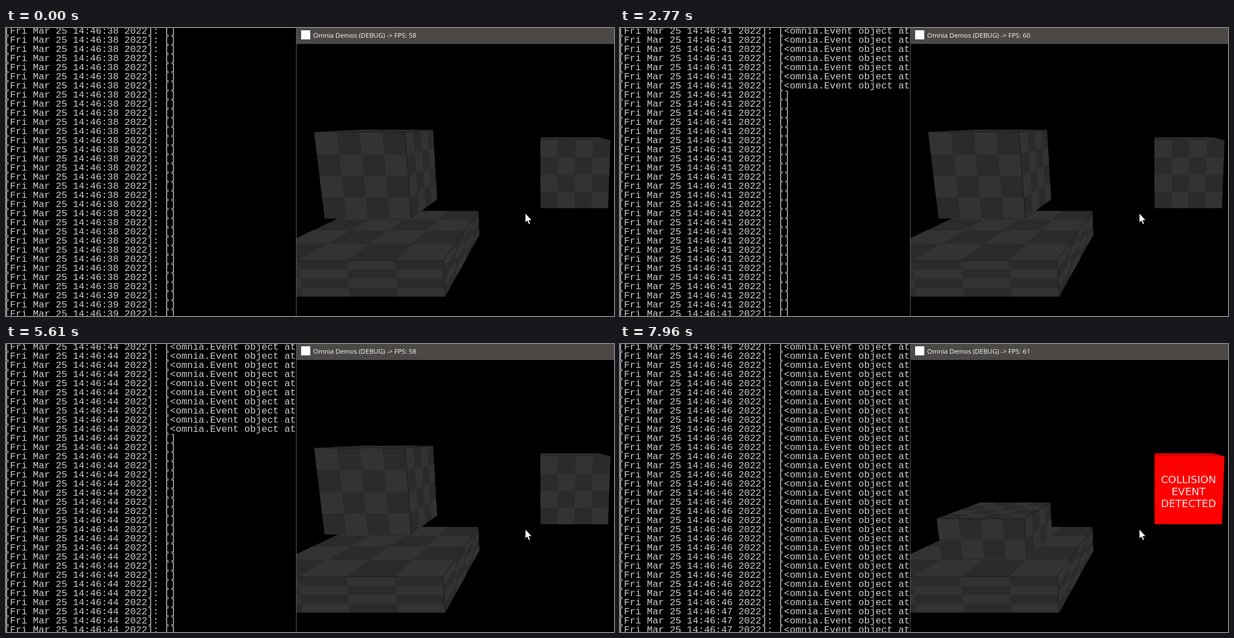
An HTML page with a canvas for the animation above (8 s loop, 1063x505 px).

```html
<!DOCTYPE html>
<html lang="en">
<head>
<meta charset="utf-8">
<title>Collision events</title>
<style>
html, body { margin: 0; width: 100%; height: 100%; overflow: hidden; background: #000; }
canvas { display: block; }
</style>
</head>
<body>
<canvas id="stage" width="1063" height="505"></canvas>
<script>
const ctx = document.getElementById('stage').getContext('2d');
const LOOP = 8000;
const ROWS = 32, LINE_MS = 20.5, SECOND_MS = 995, PRINT_LAG = 20;
const STEP_MS = 210, CONTACT = 2;
const LIGHT = '#333', DARK = '#2b2b2b', EDGE = '#1a1a1a';
const FPS = [58, 52, 61, 60, 58, 61, 58, 58, 61];

// The cube goes down by some steps and later comes up again
const plunges = [
  { down: 150, up: 2030, steps: 3 },
  { down: 3395, up: 4940, steps: 3 },
  { down: 6500, up: Infinity, steps: 3 },
  { down: 7930, up: Infinity, steps: 1 }
];

const stepsSince = (start, t, max) =>
  Math.max(0, Math.min(max, Math.floor((t - start) / STEP_MS) + 1));

const depthAt = t => plunges.reduce((sum, { down, up, steps }) =>
  sum + stepsSince(down, t, steps) - stepsSince(up, t, steps), 0);

const hitAt = t => depthAt(t) >= CONTACT;

function logLine(t) {
  const second = 39 + Math.floor((t + 55) / SECOND_MS);
  const events = hitAt(t - PRINT_LAG) ? '[<omnia.Event object at' : '[]';
  return `[Fri Mar 25 14:46:${second} 2022]: ${events}`;
}

// Camera: depth lines meet at (936, 165), verticals at (936, 3500)
function project(x, y, z) {
  const w = 1 + y + z;
  return [936 + x / w, (408 + 3500 * y + 165 * z) / w];
}

function path(points) {
  ctx.beginPath();
  points.forEach(p => ctx.lineTo(...p));
}

// A checkered face; at(u, v) gives the screen point
function face(at, light, dark) {
  const quad = (u, v, s, color) => {
    path([at(u, v), at(u + s, v), at(u + s, v + s), at(u, v + s)]);
    ctx.fillStyle = color;
    ctx.fill();
  };
  quad(0, 0, 1, dark);
  if (light === dark) return;
  for (let col = 0; col < 4; col++)
    for (let row = col % 2; row < 4; row += 2) quad(col / 4, row / 4, 1 / 4, light);
}

function box({ x, y, z, w, h, d, floor = 1 }, front, top = front) {
  const at = (u, v, s) => project(x + w * u, Math.min(y + h * v, floor), z + d * s);
  face((u, v) => at(u, 0, 1 - v), ...top);
  if (x + w < 0) face((u, v) => at(1, v, u), ...front);
  face((u, v) => at(u, v, 0), ...front);
  return at;
}

function outlinedBox(shape) {
  const at = box(shape, [LIGHT, DARK]);
  ctx.strokeStyle = EDGE;
  ctx.lineWidth = 1;
  const corner = at(1, 0, 0);
  for (const end of [at(0, 0, 0), at(1, 1, 0), at(1, 0, 1)]) {
    path([corner, end]);
    ctx.stroke();
  }
}

function drawConsole(t) {
  ctx.font = '16.67px "Liberation Mono", monospace';
  ctx.textAlign = 'left';
  ctx.fillStyle = '#ccc';
  for (let row = 0; row < ROWS; row++) {
    ctx.fillText(logLine(t - (ROWS - 1 - row) * LINE_MS), -3, 10 + 16 * row);
  }
}

function drawScene(t) {
  const hit = hitAt(t);
  outlinedBox({ x: -511, y: 0, z: 0, w: 339.5, h: .0208, d: .56 });
  outlinedBox({ x: -430, y: -.0673 + .0105 * depthAt(t), z: .15, w: 172, h: .0519, d: .28, floor: 0 });
  box({ x: -2.2, y: -.0594, z: .466, w: 172.2, h: .0526, d: .28 },
    hit ? ['#f00', '#f00'] : [LIGHT, DARK], hit ? ['#d80000', '#d80000'] : [DARK, DARK]);
  if (hit) {
    ctx.font = '18px "DejaVu Sans", sans-serif';
    ctx.textAlign = 'center';
    ctx.fillStyle = '#ffe4e4';
    ['COLLISION', 'EVENT', 'DETECTED'].forEach((s, i) => ctx.fillText(s, 994, 244 + 21 * i));
  }
}

function drawWindow(t) {
  ctx.fillStyle = '#000';
  ctx.fillRect(507, 0, 556, 505);
  ctx.fillStyle = '#5a5a5a';
  ctx.fillRect(507, 0, 1, 505);
  ctx.save();
  ctx.beginPath();
  ctx.rect(508, 28, 555, 477);
  ctx.clip();
  drawScene(t);
  ctx.restore();

  ctx.fillStyle = '#4b4846';
  ctx.fillRect(508, 0, 555, 28);
  ctx.fillStyle = '#fff';
  ctx.fillRect(516, 4, 16, 16);
  ctx.font = '11.5px "Open Sans", sans-serif';
  ctx.textAlign = 'left';
  ctx.fillText(`Omnia Demos (DEBUG) -> FPS: ${FPS[Math.floor((t + 400) / 1000)]}`, 537, 17);
}

function drawCursor() {
  path([[908, 325], [908, 341], [911.5, 338], [914, 344], [916.5, 343], [914, 337.3], [919, 337]]);
  ctx.closePath();
  ctx.fillStyle = '#fff';
  ctx.fill();
  ctx.strokeStyle = '#000';
  ctx.lineWidth = .6;
  ctx.stroke();
}

function draw() {
  const t = performance.now() % LOOP;
  ctx.fillStyle = '#000';
  ctx.fillRect(0, 0, 1063, 505);
  drawConsole(t);
  drawWindow(t);
  drawCursor();
  requestAnimationFrame(draw);
}
draw();
</script>
</body>
</html>
```
